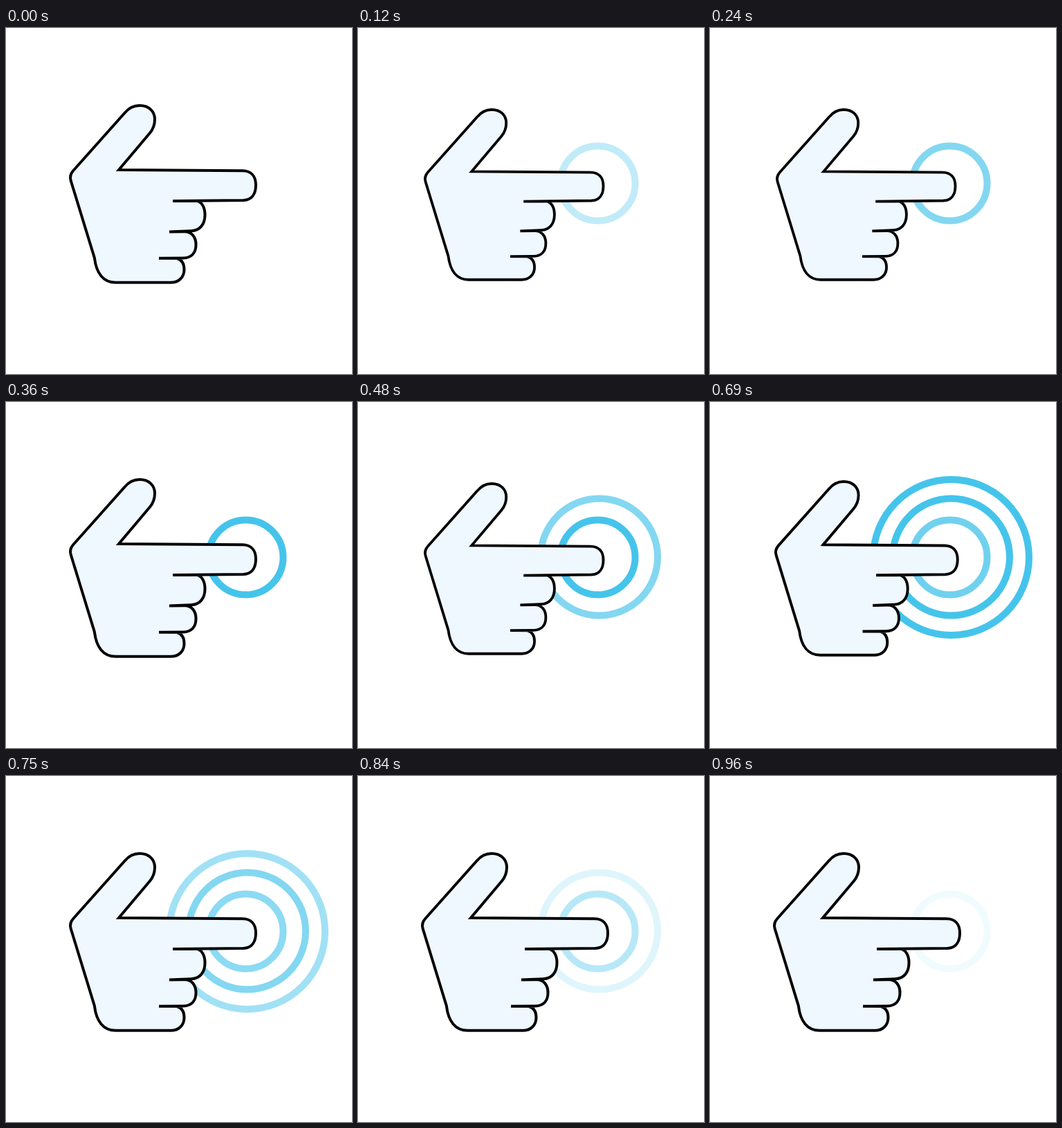
These frames come from a looping animation (500 px wide and 500 px high, 1320 ms). An HTML page:

```html
<!DOCTYPE html>
<html lang="en">
<head>
<meta charset="utf-8">
<title>Tapping hand</title>
<style>
  html, body { margin: 0; width: 100%; height: 100%; overflow: hidden; background: #fff; }
  svg { display: block; width: 100%; height: 100%; }
</style>
</head>
<body>
<svg viewBox="0 0 500 500">
  <g fill="none" stroke="#45c4eb" stroke-width="10">
    <circle class="ring" cx="346.5" cy="224.5" r="54"/>
    <circle class="ring" cx="348.5" cy="224" r="84.5"/>
    <circle class="ring" cx="348.5" cy="224.5" r="112.5"/>
  </g>
  <path id="hand" fill="#eff8ff" stroke="#000" stroke-width="4" d="
    M163 205 L342 206.3
    C354 206.5 361 214 361 227 C361 240 355 248.4 343 248.9
    L241 250 L275 249.8
    C283 251 287.5 259 287.5 270 C287.5 284 280 292.7 268 293.2
    L236 294.5 L258 294.2
    C268 294 274.5 302 274.5 313 C274.5 325 268 332.2 256 332.5
    L221 332.8 L247 333
    C254 335 257.5 341 257.5 349 C257.5 360 250 367.8 238 367.8
    L158.5 367.8
    C140.5 367.8 130.5 354 127.8 332
    L93.8 221 C91.8 215 93.2 210.5 97.3 206
    L171.5 122.8
    C177.5 115.5 184 112 193 112 C207 112 215 121 215 132
    C215 139 212 147 207.7 152 Z"/>
</svg>
<script>
  const STEP = 30, LOOP = 1320, LAST = 32;
  const PRESS = 6, PRESSES_END = 24, DEPTH = 0.0585;
  const PIVOT = [195, 265];

  // Fade-in start and end, fade-out start and end, in steps.
  const FADES = [
    [0, 12, 20, 33],
    [12, 18, 23, 29],
    [18, 23, 23, 27]
  ];

  const hand = document.getElementById('hand');
  const rings = document.querySelectorAll('.ring');
  const ramp = (n, a, b) => Math.min(1, Math.max(0, (n - a) / (b - a)));

  function pressAmount(n) {
    if (n >= PRESSES_END) return 0;
    return 1 - Math.abs((n % PRESS) / (PRESS / 2) - 1);
  }

  function draw(time) {
    const n = Math.min(LAST, Math.floor((time % LOOP) / STEP + 0.001));
    const [x, y] = PIVOT;
    const scale = 1 - DEPTH * pressAmount(n);
    hand.setAttribute('transform', `translate(${x} ${y}) scale(${scale}) translate(${-x} ${-y})`);
    rings.forEach((ring, i) => {
      const [inA, inB, outA, outB] = FADES[i];
      ring.setAttribute('opacity', ramp(n, inA, inB) * (1 - ramp(n, outA, outB)));
    });
  }

  const start = performance.now();
  function tick() {
    draw(Math.max(0, performance.now() - start));
    requestAnimationFrame(tick);
  }
  draw(0);
  requestAnimationFrame(tick);
</script>
</body>
</html>
```
